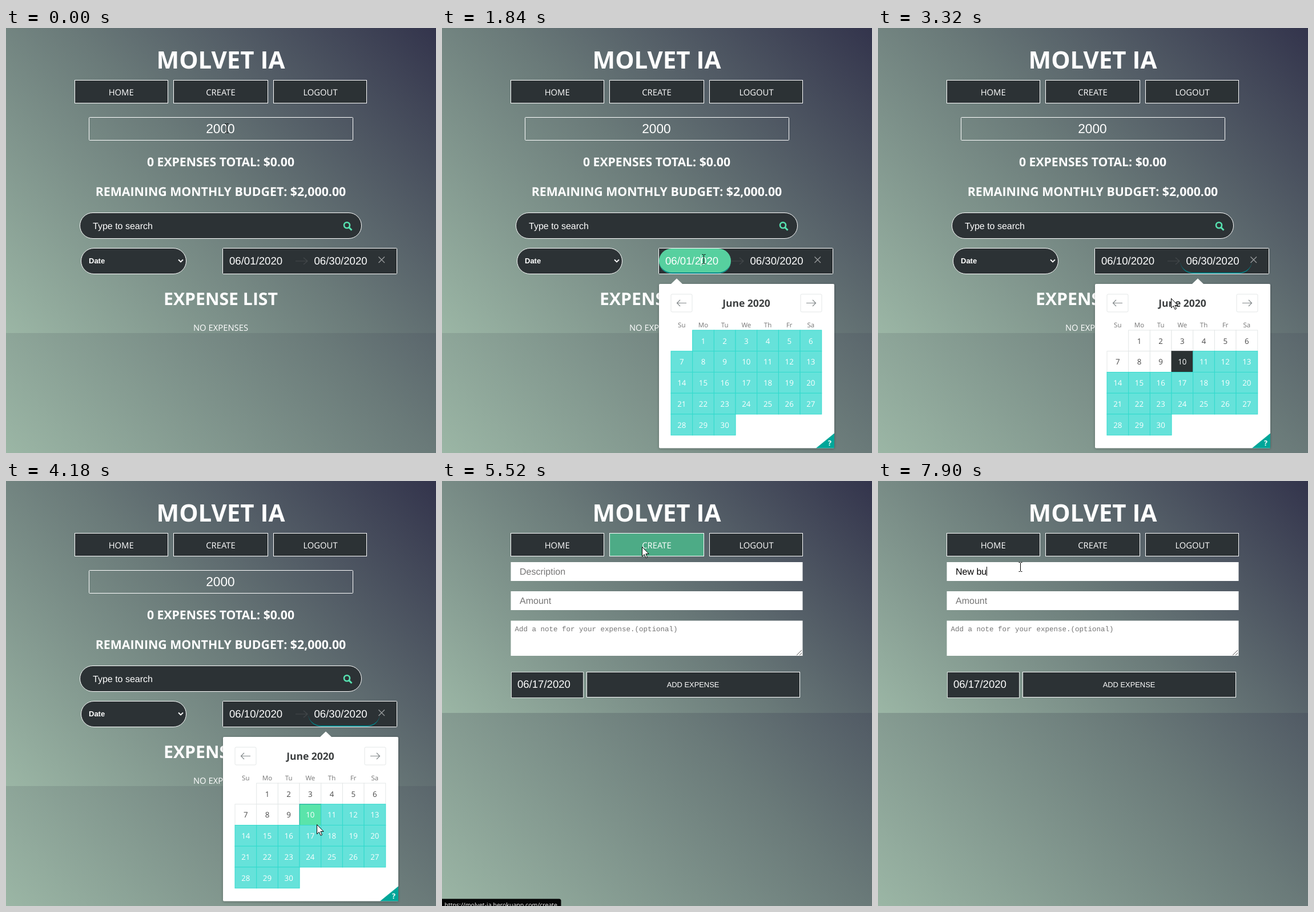
An HTML page for the animation above (7.99 s loop, 753 px wide and 744 px high).

```html
<!DOCTYPE html>
<html lang="en">
<head>
<meta charset="utf-8">
<title>Budget planner</title>
<style>
  html, body { margin: 0; width: 100%; height: 100%; overflow: hidden; }
  html, #page { background: linear-gradient(45deg, #9bb6a5, #6a7a79 50%, #33344c) no-repeat; }
  #page, svg { position: absolute; top: 0; left: 0; width: 753px; }
  svg { height: 744px; font-family: "Open Sans", "Noto Sans", sans-serif; text-rendering: geometricPrecision; }
  text { white-space: pre; }
  .arial { font-family: "Liberation Sans", Arial, sans-serif; }
  .mono { font-family: "Liberation Mono", "Courier New", monospace; }
  .bold { font-weight: 700; }
</style>
</head>
<body>
<div id="page"></div>
<svg viewBox="0 0 753 744">
  <defs>
    <clipPath id="clip"><rect id="clipBox" x="370" y="430" width="330" height="300"/></clipPath>
    <filter id="shadow" x="-10%" y="-10%" width="120%" height="120%">
      <feDropShadow dx="0" dy="1" stdDeviation="2" flood-opacity=".3"/>
    </filter>
  </defs>
  <g id="nav"></g>
  <g id="home"></g>
  <g id="calendar"></g>
  <g id="form"></g>
  <g id="status"></g>
  <path id="caret" stroke-width="1"/>
  <g id="arrow"><path d="M0 0V16.5L3.8 13L6.5 19L9 18L6.4 12H11.6Z" fill="#fff" stroke="#000"/></g>
  <g id="beam" fill="none">
    <path d="M-3 -8H-1L0 -7L1 -8H3M0 -7V7M-3 8H-1L0 7L1 8H3" stroke="#000"/>
  </g>
</svg>
<script>
const LOOP = 7990, OPEN = 1570, PICK = 2590, SWITCH = 5520;
const DARK = '#2c3235', GREEN = '#57d09f', WHITE = '#fff';
const $ = id => document.getElementById(id);

function add(parent, tag, attrs, content = '') {
  const el = document.createElementNS('http://www.w3.org/2000/svg', tag);
  for (const k in attrs) el.setAttribute(k, attrs[k]);
  el.textContent = content;
  return (typeof parent === 'string' ? $(parent) : parent).appendChild(el);
}
const label = (parent, x, y, size, str, cls = '', fill = WHITE, anchor = 'start') =>
  add(parent, 'text', { x, y, 'font-size': size, class: cls, fill, 'text-anchor': anchor }, str);
const centred = (parent, x, y, size, str, cls, fill) =>
  label(parent, x, y, size, str, cls, fill, 'middle');
const box = (parent, x, y, width, height, fill = DARK, stroke = WHITE, rx = 0) =>
  add(parent, 'rect', { x, y, width, height, fill, stroke, rx });
const line = (parent, d, stroke, width = 1) =>
  add(parent, 'path', { d, stroke, fill: 'none', 'stroke-width': width });
const show = (el, on) => el.setAttribute('visibility', on ? 'visible' : 'hidden');

// Header
centred('nav', 376, 71, 42, 'MOLVET IA', 'bold');
box('nav', 120.5, 91.5, 163, 40);
box('nav', 293.5, 91.5, 165, 40);
const createHover = box('nav', 293.5, 91.5, 165, 40, GREEN);
box('nav', 468.5, 91.5, 163, 40);
centred('nav', 201.7, 118, 14.8, 'HOME');
centred('nav', 376, 118, 14.8, 'CREATE');
centred('nav', 550.5, 118, 14.8, 'LOGOUT');

// Overview page
box('home', 145.5, 156.5, 462, 40, 'none', WHITE, 1);
centred('home', 375.5, 184, 22.7, '2000', 'arial');
centred('home', 376, 242, 21.2, '0 EXPENSES TOTAL: $0.00', 'bold');
centred('home', 376, 294, 21.3, 'REMAINING MONTHLY BUDGET: $2,000.00', 'bold');
box('home', 129.5, 323.5, 493, 45, DARK, WHITE, 22.5);
label('home', 152, 351.5, 16, 'Type to search', 'arial');
add('home', 'circle', { cx: 597, cy: 345.3, r: 5, fill: 'none', stroke: '#57e3b1', 'stroke-width': 2.6 });
line('home', 'M600.5 349L605.5 354', '#57e3b1', 3);
box('home', 131.5, 385.5, 184, 45, DARK, WHITE, 22.5);
label('home', 145, 411.5, 13, 'Date', 'arial bold');
line('home', 'M302 405.5L306 409.5L310 405.5', WHITE, 1.8);
box('home', 379.5, 385.5, 305, 45, DARK, WHITE, 1);
const startHover = box('home', 380, 386, 126, 44, GREEN, 'none', 22);
const endHover = box('home', 529, 386, 126, 44, GREEN, 'none', 22);
const underline = add('home', 'path', {
  d: 'M0 407.5A23 22.5 0 0 0 23 430H103A23 22.5 0 0 0 126 407.5A23 20.5 0 0 1 103 428H23A23 20.5 0 0 1 0 407.5Z',
  fill: '#008489'
});
line('home', 'M507 408H528M521 402L528 408L521 414', '#44494c', 1.1);
line('home', 'M652.5 400.5L663 411M663 400.5L652.5 411', '#9a9d9e', 1.3);
const startText = label('home', 391, 413.5, 18.6, '', 'arial');
label('home', 539.5, 413.5, 18.6, '06/30/2020', 'arial');
centred('home', 376, 485, 30.2, 'EXPENSE LIST', 'bold');
centred('home', 376, 530, 14.8, 'NO EXPENSES');

// Calendar
const colX = c => 401 + c * 37.68, rowY = r => 529 + r * 36.75;
const sheet = box('calendar', 380, 448, 307, 287.5, WHITE, 'none', 2);
sheet.setAttribute('filter', 'url(#shadow)');
const notch = add('calendar', 'path', { d: 'M-11 449L0 438.5L11 449Z', fill: WHITE });
const month = add('calendar', 'g', { 'clip-path': 'url(#clip)' });
box(month, 401, 466, 37, 31, WHITE, '#e4e7e7', 2);
box(month, 628, 466, 37, 31, WHITE, '#e4e7e7', 2);
line(month, 'M428 481.5H411.5M417 476L411.5 481.5L417 487', '#82888a', 1.2);
line(month, 'M638 481.5H655M649 476L654.5 481.5L649 487', '#82888a', 1.2);
centred(month, 533, 488, 17.5, 'June 2020', 'bold', '#3c3f40');
['Su', 'Mo', 'Tu', 'We', 'Th', 'Fr', 'Sa'].forEach((name, c) =>
  centred(month, colX(c) + 18.8, 524, 11.5, name, '', '#757575'));
const days = Array.from({ length: 30 }, (_, i) => {
  const c = (i + 1) % 7, r = Math.floor((i + 1) / 7), x = colX(c), y = rowY(r);
  return {
    x, y, n: i + 1,
    cell: box(month, x, y, 37.68, 36.75),
    text: centred(month, x + 18.8, y + 23.5, 13.3, i + 1)
  };
});
const help = add('calendar', 'g', {});
add(help, 'path', { d: 'M687 -26V0H655Z', fill: '#00a699' });
centred(help, 679, -4.5, 12.5, '?', 'bold');

// Form page
[[142, 33, 'Description'], [193, 33, 'Amount'], [244.5, 61.5, '']].forEach(([y, h, hint]) => {
  box('form', 120.5, y, 511, h, WHITE, 'none');
  if (hint) label('form', 136, y + 21.7, 16, hint, 'arial', '#757575');
});
const field = $('form').querySelector('text');
label('form', 127.5, 263, 12.5, 'Add a note for your expense.(optional)', 'mono', '#757575');
line('form', 'M621 305L630 296M626 305L630 301', '#555');
box('form', 121.5, 334.5, 126, 45, DARK, '#dfe4e2');
label('form', 131.9, 362, 18.6, '06/17/2020', 'arial');
box('form', 253.5, 334.5, 373, 44);
centred('form', 439.5, 360.5, 12.9, 'ADD EXPENSE', 'arial');

// Link preview
add('status', 'path', { d: 'M0 731.5H205Q208.5 731.5 208.5 735V744H0Z', fill: '#050606' });
label('status', 202, 745.5, 10.6, 'https://molvet-ia.herokuapp.com/create', '', WHITE, 'end');

// Pointer stops: time, x, y
const stops = [
  [90, 386, 175], [330, 198, 290], [520, 300, 417], [700, 470, 350], [860, 602, 330],
  [890, 602, 330], [1080, 450, 175], [1280, 227, 270], [1480, 400, 395], [1670, 458, 404],
  [1840, 458, 404], [2340, 515, 594], [3090, 515, 594], [3250, 482, 500], [3450, 590, 406],
  [3620, 596, 408], [3870, 572, 592], [3910, 572, 592], [4180, 544, 601], [4340, 544, 601],
  [4390, 541, 620], [4570, 541, 620], [4660, 546, 601], [4870, 546, 601], [5140, 330, 199],
  [5360, 350, 115], [5750, 350, 115], [5950, 249, 150]
];
const keys = [[7150, 'N'], [7450, 'Ne'], [7520, 'New'], [7590, 'New '], [7810, 'New b'], [7900, 'New bu']];

const ramp = (t, from, length) => Math.min(1, Math.max(0, (t - from) / length));
const smooth = u => u * u * (3 - 2 * u);
const within = (p, x, y, w, h) => p.x >= x && p.x < x + w && p.y >= y && p.y < y + h;

function pointerAt(t) {
  const i = stops.findIndex(s => s[0] > t);
  if (i < 1) {
    const [, x, y] = i ? stops[stops.length - 1] : stops[0];
    return { x, y };
  }
  const [t0, x0, y0] = stops[i - 1], [t1, x1, y1] = stops[i];
  const u = smooth(ramp(t, t0, t1 - t0));
  return { x: x0 + (x1 - x0) * u, y: y0 + (y1 - y0) * u };
}

function drawCalendar(t, p) {
  const picked = t >= PICK;
  const height = 287.5 * smooth(ramp(t, picked ? PICK + 19 : OPEN, 200));
  sheet.setAttribute('height', height);
  $('clipBox').setAttribute('height', 18 + height);
  notch.setAttribute('transform', `translate(${picked ? 560 : 411} 0)`);
  help.setAttribute('transform', `translate(0 ${448 + height})`);
  show(help, height > 26);
  for (const d of days) {
    const hover = d.y < 448 + height && within(p, d.x, d.y, 37.68, 36.75) && (!picked || t > 2810);
    const plain = picked && d.n < 10, chosen = picked && d.n === 10;
    const fill = hover ? '#5ae4aa' : plain ? WHITE : chosen ? '#2b3233' : '#66e2da';
    const edge = hover ? '#00a699' : plain ? '#e4e7e7' : chosen ? '#2b3233' : '#33dacd';
    d.cell.setAttribute('fill', fill);
    d.cell.setAttribute('stroke', edge);
    d.text.setAttribute('fill', plain && !hover ? '#484848' : WHITE);
  }
}

function drawCaret(t, typed) {
  let at = null;
  if (t >= 1670 && t < 2170) at = [453.5, 397, 417, WHITE];
  else if (t >= PICK && t < 3090) at = [632.5, 397, 417, WHITE];
  else if (t >= 6900) at = [typed ? 136.5 + field.getComputedTextLength() : 137.5, 150, 166, '#000'];
  show($('caret'), at);
  if (!at) return;
  $('caret').setAttribute('d', `M${Math.floor(at[0]) + .5} ${at[1]}V${at[2]}`);
  $('caret').setAttribute('stroke', at[3]);
}

function draw(t) {
  const p = pointerAt(t), onForm = t >= SWITCH, open = t >= OPEN && !onForm;
  $('page').style.height = (onForm ? 406 : 534) + 'px';
  show($('home'), !onForm);
  show($('form'), onForm);
  $('calendar').style.display = open ? '' : 'none';

  createHover.setAttribute('opacity', ramp(t, 5290, 300) * (1 - ramp(t, 5900, 500)));
  startHover.setAttribute('opacity', ramp(t, 1450, 350) * (1 - ramp(t, 1955, 350)));
  endHover.setAttribute('opacity', ramp(t, 3400, 150) * (1 - ramp(t, 3660, 200)));
  underline.setAttribute('transform', `translate(${t < PICK ? 380 : 529} 0)`);
  underline.style.display = open ? '' : 'none';
  startText.textContent = t < PICK ? '06/01/2020' : '06/10/2020';
  if (open) drawCalendar(t, p);

  const typed = keys.filter(k => k[0] <= t).pop();
  field.textContent = typed ? typed[1] : 'Description';
  field.setAttribute('fill', typed ? '#000' : '#757575');
  drawCaret(t, typed);

  $('status').setAttribute('opacity', ramp(t, 5370, 60) * (1 - ramp(t, 6250, 150)));

  const overText = onForm ? within(p, 121, 142, 510, 33)
    : within(p, 145, 157, 463, 40) || within(p, 130, 323, 492, 46) ||
      within(p, 380, 386, 126, 44) || within(p, 529, 386, 126, 44);
  for (const id of ['arrow', 'beam']) {
    show($(id), overText === (id === 'beam'));
    $(id).setAttribute('transform', `translate(${Math.round(p.x) + .5} ${Math.round(p.y) + .5})`);
  }
}

const begin = performance.now();
function tick() {
  draw((performance.now() - begin) % LOOP);
  requestAnimationFrame(tick);
}
tick();
</script>
</body>
</html>
```
